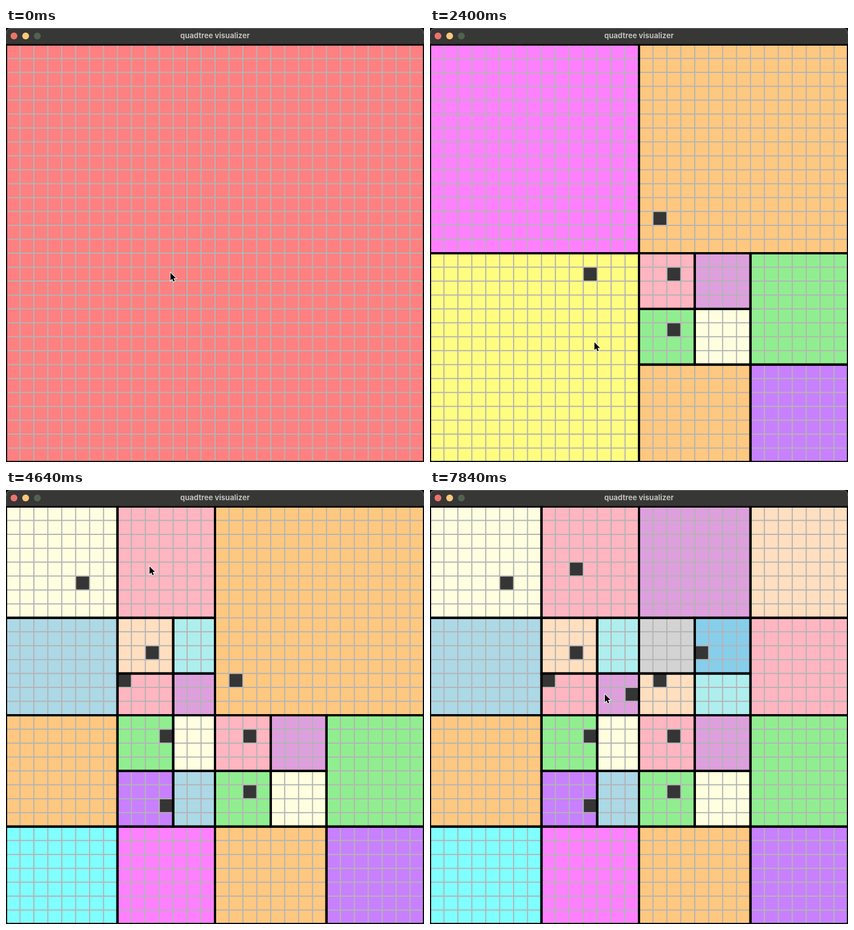
These frames come from a looping animation (734 px wide and 763 px high, 8 s). An HTML page:

```html
<!DOCTYPE html>
<html lang="en">
<head>
<meta charset="utf-8">
<title>quadtree visualizer</title>
<style>
  html, body { margin: 0; width: 100%; height: 100%; overflow: hidden; background: #000; }
  svg { display: block; width: 100%; height: 100%; }
  text { font: 700 13px Inter, Roboto, sans-serif; fill: #bebebb; text-anchor: middle; }
</style>
</head>
<body>
<svg viewBox="0 0 734 763">
  <defs><clipPath id="frame"><rect width="734" height="763" rx="8"/></clipPath></defs>
  <rect width="734" height="763"/>
  <g clip-path="url(#frame)">
    <rect width="734" height="28" fill="#373735"/>
    <path d="M0.5 10Q0.5 0.5 10 0.5H724Q733.5 0.5 733.5 10" fill="none" stroke="#696967"/>
    <circle cx="14" cy="14" r="6" fill="#ec736d"/>
    <circle cx="34.5" cy="14" r="6" fill="#fac87b"/>
    <circle cx="55" cy="14" r="6" fill="#506351"/>
    <text x="367" y="18">quadtree visualizer</text>
    <svg y="29" width="734" height="734">
      <g id="fills"></g>
      <g id="marks" fill="#353535"></g>
      <path id="grid" stroke="#b4b4b4" stroke-width="2"/>
      <g id="edges" fill="none" stroke="#000" stroke-width="4"></g>
    </svg>
  </g>
  <path id="cursor" d="M0 0V13.6L3.1 10.7L5.2 15.6L7.6 14.6L5.5 9.8H9.8Z"
        stroke="#fff" stroke-width="1.8" paint-order="stroke"/>
</svg>
<script>
const TICK = 160, TICKS = 50, CELLS = 30, SIZE = 734 / CELLS, TOP = 29;
const COLORS = ['#ff8080', '#fffd80', '#80ffff', '#ff80ff', '#ffc880', '#c880ff',
  'lightblue', 'lightgreen', 'lightyellow', 'lightpink', 'plum', '#ffdfbf',
  'paleturquoise', 'lightgray', 'skyblue'];

// clicks as tick, column, row; the last stop lies beyond the loop
const CLICKS = [
  [1, 11.8, 16.4], [6, 16.1, 12.5], [9, 17.5, 16.5], [12, 17.5, 20.5],
  [16, 11.8, 21.4], [19, 8.5, 12.4], [23, 5.95, 5.25], [26, 10.5, 10.4],
  [30, 10.3, 4.3], [35, 19.5, 10.5], [41, 14.3, 13], [TICKS, 12.55, 13.5]
].map(([tick, x, y]) => ({ tick, x, y, col: Math.floor(x), row: Math.floor(y) }));

const $ = id => document.getElementById(id);

function rect({ x, y, w, h }, fill = 'inherit') {
  const [a, b, c, d] = [x, y, w, h].map(v => (v * SIZE).toFixed(2));
  return `<rect x="${a}" y="${b}" width="${c}" height="${d}" fill="${fill}"/>`;
}

// quadrants are numbered SW, SE, NW, NE
function shade(path) {
  const depth = path.length;
  if (depth < 2) return depth ? path[0] + 1 : 0;
  return path.slice(1).reduce((sum, k) => sum + k, depth * path[0] + 2);
}

// leaves hold at most one point
function leaves(x, y, w, h, points, path = []) {
  const inside = points.filter(p => p.x >= x && p.x < x + w && p.y >= y && p.y < y + h);
  if (inside.length < 2) return [{ x, y, w, h, color: COLORS[shade(path)] }];
  const left = Math.ceil(w / 2), top = Math.ceil(h / 2);
  return [0, 1, 2, 3].flatMap(k => {
    const east = k % 2, south = k < 2;
    return leaves(east ? x + left : x, south ? y + top : y,
      east ? w - left : left, south ? h - top : top, inside, [...path, k]);
  });
}

function drawTree(points) {
  const nodes = leaves(0, 0, CELLS, CELLS, points);
  $('fills').innerHTML = nodes.map(n => rect(n, n.color)).join('');
  $('edges').innerHTML = nodes.map(n => rect(n)).join('');
  $('marks').innerHTML = points.map(p => rect({ x: p.col, y: p.row, w: 1, h: 1 })).join('');
}

// the pointer rests for a tick on either side of a click and glides in between
function pointer(tick) {
  const next = CLICKS.findIndex(c => c.tick > tick);
  const b = CLICKS[next], a = CLICKS[next - 1] || b;
  const glide = b.tick - a.tick - 2;
  const u = glide > 0 ? Math.min(1, Math.max(0, (tick - a.tick - 1) / glide)) : 1;
  const e = u * u * (3 - 2 * u);
  return [(a.x + (b.x - a.x) * e) * SIZE, TOP + (a.y + (b.y - a.y) * e) * SIZE];
}

let lines = '';
for (let i = 1; i < CELLS; i++) {
  const p = (i * SIZE).toFixed(2);
  lines += `M${p} 0V734M0 ${p}H734`;
}
$('grid').setAttribute('d', lines);

let shown = -1;
function render(now) {
  const tick = Math.floor(now / TICK) % TICKS;
  const points = CLICKS.filter(c => c.tick <= tick);
  if (points.length !== shown) {
    drawTree(points);
    shown = points.length;
  }
  $('cursor').setAttribute('transform', `translate(${pointer(tick)})`);
}

const start = performance.now();
function frame() {
  render(performance.now() - start);
  requestAnimationFrame(frame);
}
frame();
</script>
</body>
</html>
```
